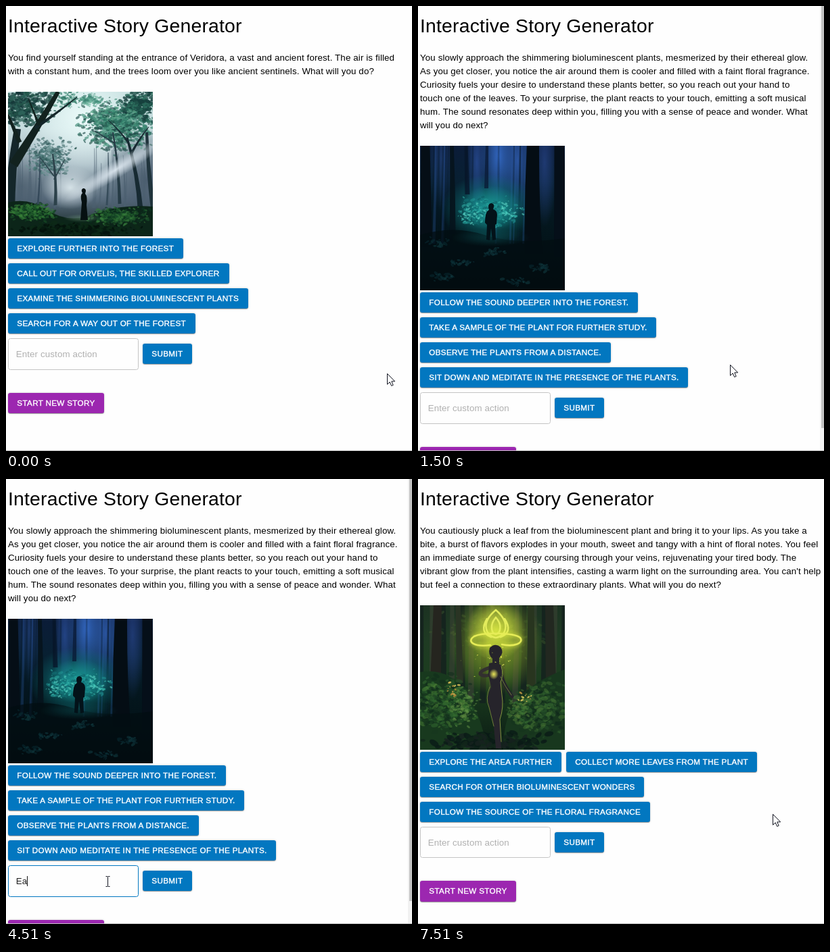
These frames come from a looping animation (600x659 px, 8000 ms). An HTML page with a canvas:

```html
<!DOCTYPE html>
<html lang="en">
<head>
<meta charset="utf-8">
<title>Interactive Story Generator</title>
<style>
  html, body { margin: 0; width: 100%; height: 100%; overflow: hidden; background: #fefefe; }
  #stage { position: absolute; left: 0; top: 0; width: 600px; height: 659px; overflow: hidden; }
  canvas, svg { position: absolute; left: 0; top: 0; }
  canvas { left: 3px; }
  text { font-family: "Liberation Sans", Arial, sans-serif; white-space: pre; }
  .title { font-size: 28.333px; letter-spacing: .00735em; }
  .body { font-size: 13.333px; letter-spacing: .00938em; }
  .label { font-size: 11.667px; letter-spacing: .02857em; fill: #fff; stroke: #fff; stroke-width: .4px; }
  .btn { fill: #0277c0; filter: drop-shadow(0 1.3px .7px rgba(0,0,0,.3)) drop-shadow(0 .8px 1.6px rgba(0,0,0,.2)); }
  .btn.hover { fill: #015386; filter: drop-shadow(0 2px 1.8px rgba(0,0,0,.34)) drop-shadow(0 1px 3px rgba(0,0,0,.2)); }
  .btn.alt { fill: #9c27b0; }
  .field { fill: none; stroke: #c4c4c4; }
  .field.focus { stroke: #0277c0; }
  .hint { fill: #b0b0b0; }
  .typed { fill: #212121; }
  .cursor { fill: #fff; stroke: #10131f; stroke-linejoin: round; }
</style>
</head>
<body>
<div id="stage"></div>
<script>
const LOOP = 8000;
const PIC = 214;
const stage = document.getElementById('stage');

function el(tag, attrs, parent, text) {
  const node = document.createElementNS('http://www.w3.org/2000/svg', tag);
  for (const key in attrs) node.setAttribute(key, attrs[key]);
  if (text) node.textContent = text;
  if (parent) parent.appendChild(node);
  return node;
}
const show = (node, on) => { node.style.display = on ? '' : 'none'; };

// ---- illustrations ----

function brush(ctx, seed) {
  const rnd = () => {
    seed = (seed * 16807) % 2147483647;
    return seed / 2147483647;
  };
  const spread = () => (rnd() + rnd() + rnd()) / 1.5 - 1;
  return {
    rnd,
    sky(...colors) {
      const g = ctx.createLinearGradient(0, 0, 0, PIC);
      colors.forEach((c, i) => g.addColorStop(i / (colors.length - 1), c));
      ctx.fillStyle = g;
      ctx.fillRect(0, 0, PIC, PIC);
    },
    glow(x, y, rx, ry, rgb, alpha, turn = 0) {
      ctx.save();
      ctx.translate(x, y);
      ctx.rotate(turn);
      ctx.scale(rx, ry);
      const g = ctx.createRadialGradient(0, 0, 0, 0, 0, 1);
      g.addColorStop(0, `rgba(${rgb},${alpha})`);
      g.addColorStop(.5, `rgba(${rgb},${alpha * .55})`);
      g.addColorStop(1, `rgba(${rgb},0)`);
      ctx.fillStyle = g;
      ctx.fillRect(-1, -1, 2, 2);
      ctx.restore();
    },
    dabs(n, x, y, rx, ry, size, colors, alpha = .8) {
      ctx.globalAlpha = alpha;
      for (let i = 0; i < n; i++) {
        ctx.fillStyle = colors[Math.floor(rnd() * colors.length)];
        ctx.beginPath();
        const s = size * (.4 + rnd());
        ctx.ellipse(x + spread() * rx, y + spread() * ry, s, s * .55, (rnd() - .5) * 1.6, 0, 7);
        ctx.fill();
      }
      ctx.globalAlpha = 1;
    },
    limb(x1, y1, x2, y2, w1, w2, color, bend = 0, alpha = 1) {
      const mx = (x1 + x2) / 2 + bend, my = (y1 + y2) / 2;
      const d = Math.hypot(x2 - x1, y2 - y1);
      const nx = (y1 - y2) / d / 2, ny = (x2 - x1) / d / 2, wm = (w1 + w2) / 2;
      ctx.globalAlpha = alpha;
      ctx.fillStyle = color;
      ctx.beginPath();
      ctx.moveTo(x1 + nx * w1, y1 + ny * w1);
      ctx.quadraticCurveTo(mx + nx * wm, my + ny * wm, x2 + nx * w2, y2 + ny * w2);
      ctx.lineTo(x2 - nx * w2, y2 - ny * w2);
      ctx.quadraticCurveTo(mx - nx * wm, my - ny * wm, x1 - nx * w1, y1 - ny * w1);
      ctx.fill();
      ctx.globalAlpha = 1;
    },
    shape(path, color) {
      ctx.fillStyle = color;
      ctx.fill(new Path2D(path));
    },
    line(path, width, color) {
      ctx.lineWidth = width;
      ctx.strokeStyle = color;
      ctx.lineCap = 'round';
      ctx.stroke(new Path2D(path));
    }
  };
}

function mistyForest(ctx) {
  const b = brush(ctx, 41);
  b.sky('#c3dddd', '#c6dcde', '#a3b6c0', '#56697a', '#0a1b16');
  b.glow(112, 40, 90, 90, '234,250,249', 1);
  b.glow(205, 130, 70, 75, '70,88,106', .9);
  b.glow(20, 140, 55, 60, '70,88,104', .75);
  for (let i = 0; i < 30; i++) {
    const x = b.rnd() * PIC;
    b.limb(x, 172, x + 8 * b.rnd() - 4, 70 + 50 * b.rnd(), 3, 1, '#4c6070', 2, .5);
  }
  b.glow(92, 142, 42, 32, '224,236,240', .9);

  b.dabs(420, 62, 98, 42, 36, 2.5, ['#4b7a7a', '#3a6664', '#6b9393', '#2e5556'], .6);
  b.limb(70, 168, 66, 92, 5, 2, '#2c414a', 4);
  b.limb(68, 130, 84, 100, 2, 1, '#2c414a');
  b.limb(68, 125, 48, 98, 2, 1, '#2c414a');
  b.limb(44, 168, 47, 95, 3, 1, '#35495a', 2);

  b.dabs(900, 164, 50, 74, 48, 3, ['#2b6c5d', '#3d8a75', '#225449', '#56a087', '#1d4a48'], .65);
  b.dabs(260, 194, 20, 34, 26, 3.5, ['#1e4f47', '#2c6d5d', '#17403d']);
  b.dabs(110, 120, 12, 28, 14, 2.4, ['#4f9a86', '#6db49c', '#38806f'], .6);
  b.dabs(160, 160, 36, 50, 26, 2.4, ['#45957c', '#2e7865', '#65ac90'], .6);
  b.limb(165, 166, 155, 60, 5, 2, '#263b45', 4);
  b.limb(196, 178, 176, 68, 8, 3, '#172a32', 6);
  b.limb(214, 170, 205, 60, 7, 4, '#20343c', -3);
  b.limb(146, 168, 148, 90, 3, 1, '#364c5a', 2);
  b.limb(182, 92, 208, 52, 4, 1, '#172a32', -3);
  b.limb(178, 76, 148, 42, 3, 1, '#172a32', 4);
  b.limb(157, 76, 128, 58, 2, 1, '#263b45');
  b.glow(160, 115, 90, 13, '226,236,244', .9, -.55);

  b.dabs(420, 22, 20, 60, 42, 3.5, ['#1d4744', '#16383a', '#2d6359', '#235449'], .75);
  b.dabs(90, 88, 12, 32, 16, 2.5, ['#2d7362', '#4a917c'], .65);
  b.limb(2, 180, 14, 55, 16, 10, '#14262a', -4);
  b.limb(8, 108, 74, 0, 14, 6, '#12221f', 2);
  b.limb(40, 54, 102, 8, 5, 1, '#14262a', 2);
  b.limb(17, 75, 0, 34, 7, 3, '#12221f');
  b.limb(46, 50, 30, 10, 4, 1, '#12221f');

  b.shape('M0 164Q30 156 58 175T118 184Q162 166 214 170V214H0Z', '#0c2519');
  b.dabs(330, 33, 178, 46, 17, 2.5, ['#174d26', '#2c7134', '#0e351e', '#3b8139'], .65);
  b.dabs(360, 164, 184, 60, 17, 2.5, ['#1b522b', '#35793a', '#0d3220', '#26632c'], .65);
  b.dabs(260, 104, 204, 110, 13, 4, ['#04110b', '#071c11', '#0c2917']);
  b.glow(110, 187, 28, 6, '112,151,126', .5);
  b.shape('M111 143Q115 143 115 147L114 151Q118 155 116 168L118 190H107L109 164Q106 153 110 150Q107 145 111 143Z', '#061011');
}

function glowingPlants(ctx) {
  const b = brush(ctx, 77);
  b.sky('#0b1c38', '#082032', '#04171f', '#031217', '#020a0d');
  b.glow(32, 20, 20, 75, '40,74,140', .55);
  b.glow(84, 25, 16, 85, '45,83,166', .7);
  b.glow(116, 15, 27, 80, '55,111,208', .9);
  b.glow(144, 22, 22, 85, '50,97,184', .8);
  b.glow(184, 25, 18, 95, '42,72,146', .65);
  for (let i = 0; i < 26; i++) {
    const x = b.rnd() * PIC;
    b.limb(x, 145, x + 3, -2, 4 * b.rnd() + 2, 2, i % 3 ? '#06141f' : '#285297', 1, .33);
  }
  b.glow(103, 94, 72, 52, '15,126,130', .95);
  b.glow(104, 92, 46, 33, '31,162,158', .7);
  b.dabs(280, 102, 98, 54, 29, 2.8, ['#137579', '#219a98', '#0c555d', '#36b9ad'], .5);
  b.dabs(42, 78, 101, 28, 22, 2, ['#5cd4c4', '#3bbeb3'], .6);
  b.dabs(40, 132, 98, 25, 23, 2, ['#5cd4c4', '#3bbeb3'], .6);
  b.limb(48, 130, 47, 0, 9, 6, '#06131c', 1, .9);
  b.limb(70, 72, 68, 0, 7, 5, '#07162a', 0, .8);
  b.limb(98, 63, 99, 0, 6, 4, '#091a34', 0, .75);
  b.limb(168, 160, 167, 0, 26, 18, '#040d14', -3);
  b.limb(207, 165, 206, 0, 18, 15, '#050f19');
  b.limb(9, 150, 8, 0, 18, 13, '#050e16');
  b.shape('M0 132Q50 117 95 132T214 137V214H0Z', 'rgba(2,13,17,.72)');
  b.glow(105, 136, 58, 13, '14,92,97', .4);
  for (const [x, y] of [[58, 174], [176, 181], [25, 143], [112, 157], [35, 193], [142, 200]])
    b.dabs(24, x, y, 28, 9, 2.8, ['#0c2f37', '#0a2931', '#123e44'], .55);
  b.shape('M105 85Q110 85 109 91L108 94Q114 96 114 102L113 116 111 117 112 139 107 140 105 122 103 140 98 139 99 117 96 114Q96 97 102 95Q99 86 105 85Z', '#031219');
}

function goldenSpirit(ctx) {
  const b = brush(ctx, 133);
  b.sky('#1c3222', '#1f3b23', '#1c3d1f', '#142e1a', '#0b1b14');
  for (let i = 0; i < 15; i++) {
    const x = i * 15 + 5 * b.rnd();
    b.limb(x, 145, x + 4 * b.rnd(), 0, 9, 6, i % 2 ? '#303d2e' : '#14231f', 1, .9);
  }
  b.dabs(160, 105, 40, 115, 50, 3, ['#31502a', '#233e25', '#4a6531'], .35);
  b.glow(112, 55, 70, 78, '151,174,40', .85);
  b.glow(112, 36, 44, 46, '226,238,71', .85);
  b.limb(22, 150, 26, 0, 17, 12, '#25251f');
  b.limb(59, 115, 56, 0, 10, 7, '#2a3424');
  b.limb(164, 130, 164, 0, 13, 9, '#28351f');
  b.limb(194, 140, 191, 0, 16, 12, '#222820');

  b.shape('M0 99Q40 92 65 125T99 214H0Z', '#18391e');
  b.shape('M214 95Q169 112 146 137T123 214H214Z', '#18371e');
  b.dabs(520, 33, 146, 53, 49, 4, ['#26572a', '#336a2f', '#17371f', '#457a33', '#102c1c'], .55);
  b.dabs(500, 176, 152, 51, 48, 4, ['#244f28', '#32602d', '#16351e', '#417032', '#0f271b'], .55);
  b.dabs(110, 65, 151, 28, 37, 2.6, ['#629345', '#407a32', '#5d8840'], .5);
  b.dabs(80, 149, 153, 24, 31, 2.6, ['#567e38', '#397133'], .5);
  b.dabs(140, 108, 203, 112, 20, 6, ['#0a1a16', '#12271a', '#17221f']);
  b.dabs(14, 48, 124, 14, 16, 2, ['#dcc05b', '#bd8b3b'], .85);
  b.dabs(10, 157, 137, 16, 13, 2, ['#dbc75c', '#bc953f'], .85);

  b.line('M112 7C88 27 98 46 112 48C127 46 135 27 112 7M112 18C102 30 106 42 112 43C119 41 122 29 112 18M99 20Q87 40 105 47M125 20Q138 40 119 47', 2.6, '#e3ec5c');
  ctx.save();
  ctx.shadowColor = '#e7f341';
  ctx.shadowBlur = 6;
  b.line('M104 59C80 62 68 54 80 46C92 40 138 40 148 48C154 56 139 62 121 58', 2.6, '#e6ec57');
  b.line('M106 61Q117 68 120 77', 2, '#dbe148');
  ctx.restore();

  const skin = '#26242b';
  b.line('M104 92Q88 97 89 102Q95 107 109 101', 5, '#33302f');
  b.line('M118 94Q120 112 136 135', 5, skin);
  b.shape('M102 86Q112 83 120 89Q124 98 119 114L121 133Q124 150 118 169L120 212H112L109 180 102 150Q97 138 105 121L101 102Z', skin);
  b.shape('M103 63Q111 55 119 62Q125 70 117 78L117 87H107L107 79Q100 73 103 63Z', skin);
  b.line('M120 90Q124 103 119 114L121 133Q124 151 118 169L120 202', 1, '#82943e');
  b.line('M103 121Q96 138 102 151L109 179M119 106Q126 121 135 133', 1, '#6e7d39');
  b.glow(109, 102, 7, 8, '241,239,91', .95);
  b.dabs(20, 110, 73, 60, 45, 1, ['#e8ea5d', '#c7d747'], .8);
}

// ---- page ----

const scenes = [
  {
    picY: 127, paint: mistyForest, fieldY: 492, fieldH: 47, startY: 573, startH: 30,
    lines: [
      'You find yourself standing at the entrance of Veridora, a vast and ancient forest. The air is filled',
      'with a constant hum, and the trees loom over you like ancient sentinels. What will you do?'
    ],
    buttons: [
      [3, 344, 259, 'EXPLORE FURTHER INTO THE FOREST'],
      [3, 381, 327, 'CALL OUT FOR ORVELIS, THE SKILLED EXPLORER'],
      [3, 418, 355, 'EXAMINE THE SHIMMERING BIOLUMINESCENT PLANTS'],
      [3, 455, 277, 'SEARCH FOR A WAY OUT OF THE FOREST']
    ]
  },
  {
    picY: 207, paint: glowingPlants, fieldY: 572, fieldH: 47, startY: 653, startH: 30,
    lines: [
      'You slowly approach the shimmering bioluminescent plants, mesmerized by their ethereal glow.',
      'As you get closer, you notice the air around them is cooler and filled with a faint floral fragrance.',
      'Curiosity fuels your desire to understand these plants better, so you reach out your hand to',
      'touch one of the leaves. To your surprise, the plant reacts to your touch, emitting a soft musical',
      'hum. The sound resonates deep within you, filling you with a sense of peace and wonder. What',
      'will you do next?'
    ],
    buttons: [
      [3, 424, 322, 'FOLLOW THE SOUND DEEPER INTO THE FOREST.'],
      [3, 461, 349, 'TAKE A SAMPLE OF THE PLANT FOR FURTHER STUDY.'],
      [3, 498, 282, 'OBSERVE THE PLANTS FROM A DISTANCE.'],
      [3, 535, 396, 'SIT DOWN AND MEDITATE IN THE PRESENCE OF THE PLANTS.']
    ]
  },
  {
    picY: 187, paint: goldenSpirit, fieldY: 515, fieldH: 46, startY: 595, startH: 31,
    lines: [
      'You cautiously pluck a leaf from the bioluminescent plant and bring it to your lips. As you take a',
      'bite, a burst of flavors explodes in your mouth, sweet and tangy with a hint of floral notes. You feel',
      'an immediate surge of energy coursing through your veins, rejuvenating your tired body. The',
      'vibrant glow from the plant intensifies, casting a warm light on the surrounding area. You can\'t help',
      'but feel a connection to these extraordinary plants. What will you do next?'
    ],
    buttons: [
      [3, 404, 209, 'EXPLORE THE AREA FURTHER'],
      [219, 404, 282, 'COLLECT MORE LEAVES FROM THE PLANT'],
      [3, 441, 331, 'SEARCH FOR OTHER BIOLUMINESCENT WONDERS'],
      [3, 478, 340, 'FOLLOW THE SOURCE OF THE FLORAL FRAGRANCE']
    ]
  }
];

// Each step: start time, scene, cursor kind and place, field content, caret x
const steps = [
  { at: 0, scene: 0, cursor: 'arrow', x: 563.5, y: 544.5 },
  { at: 500, scene: 0, cursor: 'hand', x: 337, y: 446, hover: true },
  { at: 1500, scene: 1, cursor: 'arrow', x: 461.5, y: 531.5 },
  { at: 3500, scene: 1, cursor: 'beam', x: 150.5, y: 588.5, focus: true, caret: 15 },
  { at: 4510, scene: 1, cursor: 'beam', x: 150.5, y: 588.5, focus: true, caret: 31, typed: 'Ea' },
  { at: 5510, scene: 1, cursor: 'beam', x: 150.5, y: 588.5, focus: true, caret: 61, typed: 'Eat the ' },
  { at: 6510, scene: 1, cursor: 'beam', x: 150.5, y: 588.5, focus: true, typed: 'Eat the plant' },
  { at: 7510, scene: 2, cursor: 'arrow', x: 524.5, y: 496.5 }
];

function button(parent, x, y, width, text, kind = '', height = 30) {
  const box = el('rect', { x, y, width, height, rx: 3.3, class: 'btn ' + kind }, parent);
  el('text', { x: x + 13.33, y: y + 19, class: 'label' }, parent, text);
  return box;
}

function buildScene(s) {
  s.canvas = document.createElement('canvas');
  s.canvas.width = s.canvas.height = PIC;
  s.canvas.style.top = s.picY + 'px';
  stage.insertBefore(s.canvas, svg);
  s.paint(s.canvas.getContext('2d'));

  const g = s.group = el('g', {}, svg);
  s.lines.forEach((line, i) => el('text', { x: 3, y: 81 + 20 * i, class: 'body' }, g, line));
  s.boxes = s.buttons.map(args => button(g, ...args));
  s.field = el('rect', { x: 3.5, y: s.fieldY + .5, width: 192, height: s.fieldH - 1, rx: 3, class: 'field' }, g);
  s.input = el('text', { x: 14.67, y: s.fieldY + 28 }, g);
  button(g, 202, s.fieldY + 8, 73, 'SUBMIT');
  button(g, 3, s.startY, 142, 'START NEW STORY', 'alt', s.startH);
}

const svg = el('svg', { width: 600, height: 659, viewBox: '0 0 600 659' });
stage.appendChild(svg);
el('text', { x: 3, y: 39, class: 'title' }, svg, 'Interactive Story Generator');
scenes.forEach(buildScene);

const scrollbar = el('g', {}, svg);
el('rect', { x: 594, y: 0, width: 6, height: 658, fill: '#f1f1f1' }, scrollbar);
el('rect', { x: 596, y: 0, width: 4, height: 625, fill: '#c1c1c1' }, scrollbar);
el('rect', { x: 0, y: 658, width: 600, height: 1, fill: '#b8b8b8' }, svg);

const caret = el('rect', { y: 588, width: 1, height: 15, fill: '#111' }, svg);
const cursors = {
  arrow: 'M0 0V15.8L3.7 12.4L6.2 18L8.7 16.9L6.3 11.4H11.2Z',
  hand: 'M6.5 13V2Q6.5 .5 8 .5T9.5 2V7.5Q11.2 6.2 12.3 7.8Q14.2 6.9 15 8.7Q17.5 8.1 17.5 10.6V15Q17.2 18 15.5 19.5V21.5H7.5V20L1 13Q0 11 2 10.4Q3.6 10.2 6.5 13ZM9.5 7.5V12M12.3 8V12M15 9V12',
  beam: 'M-3 0H-1Q0 0 0 1Q0 0 1 0H3M0 1V14M-3 15H-1Q0 15 0 14Q0 15 1 15H3'
};
const pointer = el('path', { class: 'cursor' }, svg);

function render(time) {
  const step = steps.filter(s => s.at <= time).pop();
  scenes.forEach((s, i) => {
    show(s.group, i === step.scene);
    show(s.canvas, i === step.scene);
  });
  const s = scenes[step.scene];
  s.boxes[2].classList.toggle('hover', !!step.hover);
  s.field.classList.toggle('focus', !!step.focus);
  s.input.textContent = step.typed || 'Enter custom action';
  s.input.setAttribute('class', step.typed ? 'body typed' : 'body hint');
  show(scrollbar, step.scene === 1);
  show(caret, step.caret);
  caret.setAttribute('x', step.caret || 0);
  pointer.setAttribute('d', cursors[step.cursor]);
  pointer.setAttribute('transform', `translate(${step.x} ${step.y})`);
}

const start = performance.now();
function tick() {
  render((performance.now() - start) % LOOP);
  requestAnimationFrame(tick);
}
tick();
</script>
</body>
</html>
```
